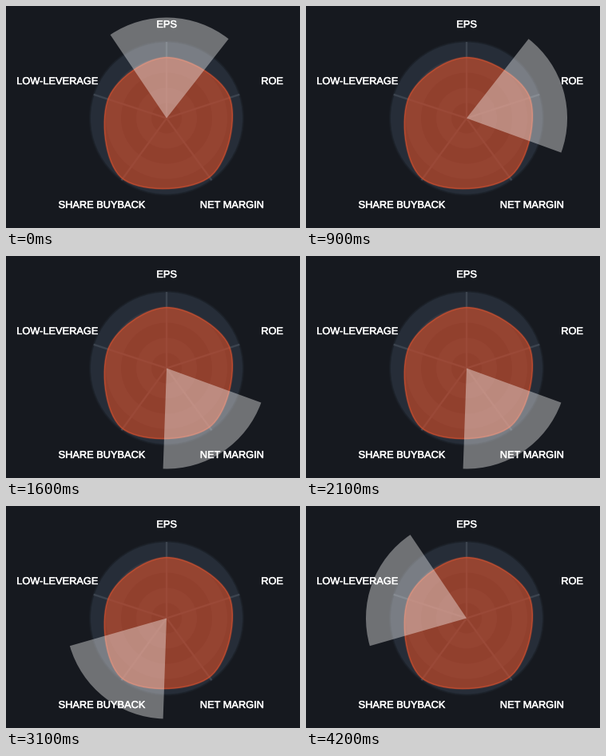
Write a matplotlib script that moves like this. It is 368x278 px and loops after 4.3 s.

```python
import numpy as np
import matplotlib.pyplot as plt
from matplotlib.animation import FuncAnimation
from matplotlib.patches import Circle, PathPatch, Wedge
from matplotlib.path import Path
from matplotlib.patheffects import Normal, Stroke

W, H, DPI = 368, 278, 100
PX = 72 / DPI
CENTER = np.array([201, 140.5])
RADIUS = 95
REACH = 126
STEP = 100
FRAMES = 43

BG = "#16191f"
RINGS = ["#262d38", "#303742"]
SPOKE = "#3c444f"
FILL = "#da4d27"
EDGE = "#e2542f"

LABELS = [
    ("EPS", 201, 27),
    ("ROE", 333, 98),
    ("NET MARGIN", 282.5, 253),
    ("SHARE BUYBACK", 119.5, 253),
    ("LOW-LEVERAGE", 64, 98),
]
VALUES = [0.80, 0.875, 0.96, 0.985, 0.81]
SWITCH_MS = [0, 900, 1600, 2200, 3300]


def polar(angle, r):
    """Point at a clockwise angle in degrees from the top."""
    a = np.radians(angle)
    return CENTER + r * np.array([np.sin(a), -np.cos(a)])


def smooth_loop(pts, tension=0.35):
    """Closed Bezier path, handles weighted by neighbour distance."""
    n = len(pts)
    ins, outs = [], []
    for i, p in enumerate(pts):
        a, b = pts[i - 1], pts[(i + 1) % n]
        d0, d1 = np.linalg.norm(p - a), np.linalg.norm(b - p)
        v = (b - a) * tension / (d0 + d1)
        ins.append(p - v * d0)
        outs.append(p + v * d1)
    verts = [pts[0]]
    for i in range(n):
        j = (i + 1) % n
        verts += [outs[i], ins[j], pts[j]]
    return Path(verts, [Path.MOVETO] + [Path.CURVE4] * (3 * n))


fig = plt.figure(figsize=(W / DPI, H / DPI), dpi=DPI, facecolor=BG)
ax = fig.add_axes([0, 0, 1, 1])
ax.set_xlim(0, W)
ax.set_ylim(H, 0)
ax.axis("off")

# Dial
for spread in (2, 1):
    ax.add_patch(Circle(CENTER, RADIUS + spread, fc=RINGS[0], alpha=0.3, lw=0))
for k in range(5, 0, -1):
    ax.add_patch(Circle(CENTER, RADIUS * k / 5, fc=RINGS[k % 2 == 0], lw=0))
for k in range(5):
    spoke = Path([CENTER, polar(72 * k, RADIUS + 1)])
    ax.add_patch(PathPatch(spoke, fc="none", ec=SPOKE, lw=2.4 * PX,
                           capstyle="butt"))

# Data shape
shape = smooth_loop([polar(72 * k, RADIUS * v) for k, v in enumerate(VALUES)])
ax.add_patch(PathPatch(shape, fc=FILL, alpha=0.6, lw=0))
for width, alpha in ((3, 0.15), (1.2, 0.65)):
    ax.add_patch(PathPatch(shape, fc="none", ec=EDGE, alpha=alpha, lw=width * PX))

beam = Wedge(CENTER, REACH, 0, 72, fc="white", alpha=0.385, lw=0)
ax.add_patch(beam)

bolder = [Stroke(linewidth=0.45 * PX, foreground="white"), Normal()]
for text, x, y in LABELS:
    ax.text(x, y, text, color="white", family="Liberation Sans",
            size=12.8 * PX, ha="center", va="baseline", path_effects=bolder)


def draw(i):
    sector = sum(i * STEP >= t for t in SWITCH_MS) - 1
    start = 72 * sector - 34 - 90
    beam.set_theta1(start)
    beam.set_theta2(start + 72)
    return [beam]


anim = FuncAnimation(fig, draw, frames=FRAMES, interval=STEP,
                     repeat=True, repeat_delay=0)
plt.show()
```
